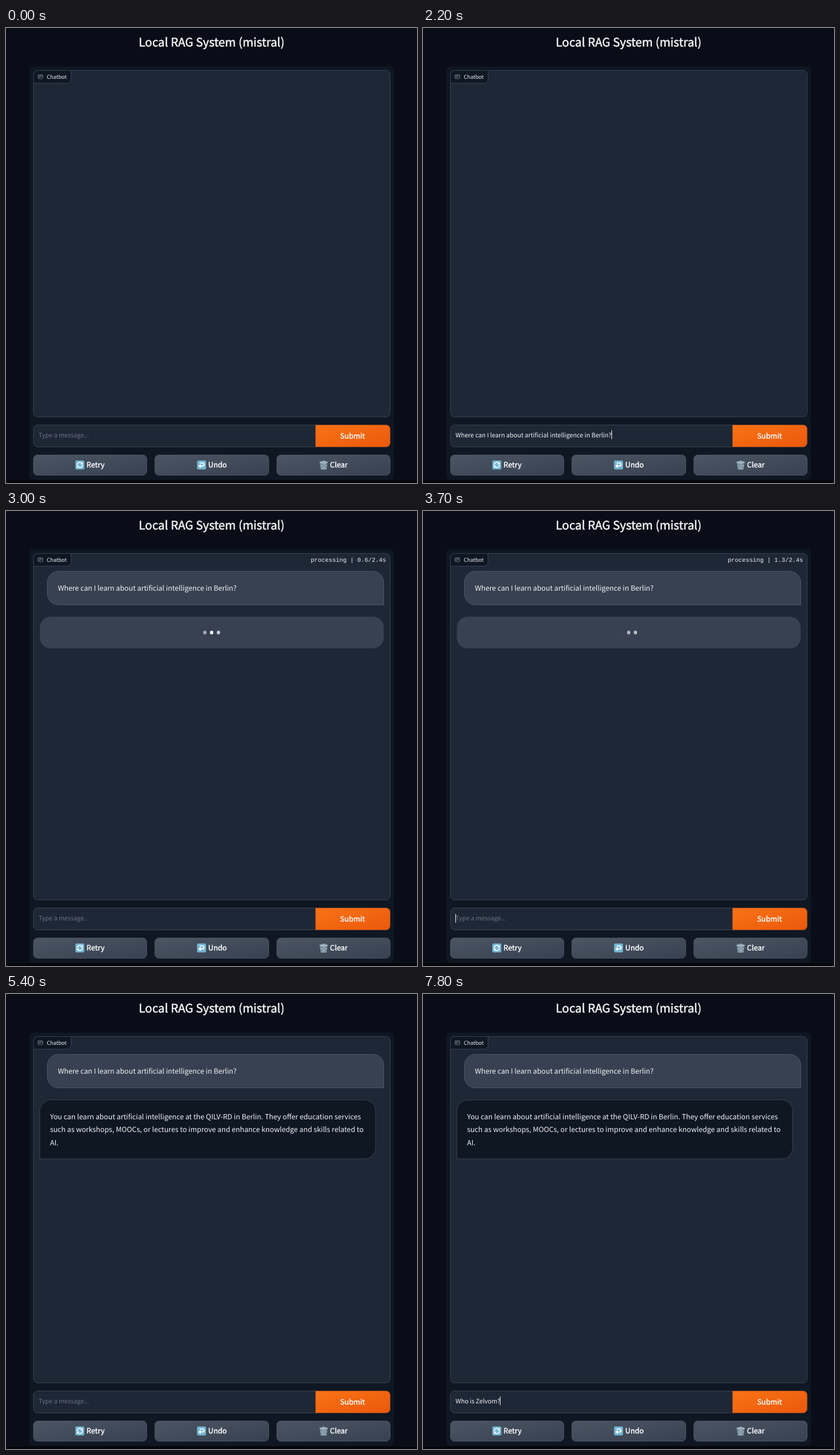
These frames come from a looping animation (711 by 788 pixels, 8 s). An HTML page:

```html
<!DOCTYPE html>
<html lang="en">
<head>
<meta charset="utf-8">
<title>Local RAG System</title>
<style>
  html, body { margin: 0; width: 100%; height: 100%; overflow: hidden; background: #0a0d17; }
  svg { display: block; width: 100vw; height: 100vh; }
  text {
    font-family: "Noto Sans CJK SC", "Noto Sans CJK JP", "Noto Sans", sans-serif;
    font-size: 12.25px; fill: #f3f4f6; text-rendering: geometricPrecision; white-space: pre;
  }
  .title { font-size: 20.35px; stroke: #f3f4f6; stroke-width: .55px; text-anchor: middle; }
  .button { font-size: 12.6px; fill: #fff; stroke: #fff; stroke-width: .4px; }
  .small { font-size: 9.17px; }
  .input { font-size: 10.7px; }
  .hint { fill: #6b7280; }
  .mono { font-family: "Liberation Mono", monospace; font-size: 10.35px; text-anchor: end; }
  .panel { fill: #0f1723; }
  .block { fill: #1e2736; stroke: #374151; }
  .label { fill: #0f1723; stroke: #374151; }
  .user { fill: #374151; stroke: #4b5563; }
  .grey { fill: url(#grey); stroke: #4b5563; }
  .line { fill: none; stroke-linecap: round; stroke-linejoin: round; }
</style>
</head>
<body>
<svg viewBox="0 0 711 788" preserveAspectRatio="none">
  <defs>
    <linearGradient id="grey" x1="0" y1="0" x2="1" y2="1">
      <stop stop-color="#4b5563"/><stop offset="1" stop-color="#374151"/>
    </linearGradient>
    <linearGradient id="orange" x1="0" y1="0" x2="1" y2="1">
      <stop stop-color="#f97316"/><stop offset="1" stop-color="#ea580c"/>
    </linearGradient>
  </defs>

  <rect y="784" width="711" height="4" fill="#050509"/>
  <text class="title" x="355.8" y="31.7">Local RAG System (mistral)</text>
  <rect class="panel" x="40.5" y="66.5" width="630.5" height="716" rx="7"/>

  <rect class="block" x="47.5" y="73.5" width="617" height="600" rx="7"/>
  <path class="label" d="M47.5 95.5V80.5a7 7 0 0 1 7-7H112.5V88.5a7 7 0 0 1-7 7z"/>
  <path class="line" stroke="#9ca3af" stroke-width=".8"
    d="M58.5 87.3H56.3q-.8 0-.8-.8V82q0-.8.8-.8h6.4q.8 0 .8.8v4.500q0 .8-.8.8H61.500l-1.500 1.700M57.300 83.200h4.400M57.300 85.200h2.800"/>
  <text class="small" x="70.6" y="87.5">Chatbot</text>
  <text class="mono" id="status" x="657.5" y="88"></text>

  <g id="question">
    <path class="user" d="M71.5 123.500a19 19 0 0 1 19-19H634.500a19 19 0 0 1 19 19V162.500H90.500a19 19 0 0 1-19-19z"/>
    <text x="89.7" y="137.8">Where can I learn about artificial intelligence in Berlin?</text>
  </g>
  <g id="pending">
    <rect x="58.5" y="183" width="595" height="55" rx="19" fill="#374151"/>
    <g id="dots" fill="#f9fafb">
      <ellipse cx="344" cy="210.500" rx="2.800" ry="3.200"/>
      <ellipse cx="355.800" cy="210.500" rx="2.800" ry="3.200"/>
      <ellipse cx="367.500" cy="210.500" rx="2.800" ry="3.200"/>
    </g>
  </g>
  <g id="answer">
    <path class="label" d="M58.500 285.500V202.500a19 19 0 0 1 19-19H620.500a19 19 0 0 1 19 19V266.500a19 19 0 0 1-19 19z"/>
    <text x="76.2" y="216.800">You can learn about artificial intelligence at the QILV-RD in Berlin. They offer education services</text>
    <text x="76.2" y="239.300">such as workshops, MOOCs, or lectures to improve and enhance knowledge and skills related to</text>
    <text x="76.2" y="261.500">AI.</text>
  </g>

  <path class="block" d="M535.500 725.500H54.500a7 7 0 0 1-7-7V694.500a7 7 0 0 1 7-7H535.500z"/>
  <text class="input hint" id="hint" x="56.3" y="709.300">Type a message...</text>
  <text class="input" id="typed" x="56.3" y="709.300"></text>
  <rect id="caret" y="698" width="1" height="15" fill="#f3f4f6"/>
  <path fill="url(#orange)" stroke="#9a4a20" d="M535.500 687.500H657.500a7 7 0 0 1 7 7V718.500a7 7 0 0 1-7 7H535.500z"/>
  <text class="button" x="599.5" y="710.600" text-anchor="middle">Submit</text>

  <rect class="grey" x="47.500" y="739.500" width="196" height="35" rx="7"/>
  <rect class="grey" x="257.500" y="739.500" width="197" height="35" rx="7"/>
  <rect class="grey" x="468.500" y="739.500" width="196" height="35" rx="7"/>
  <text class="button" x="139.300" y="761.400">Retry</text>
  <text class="button" x="349.800" y="761.400">Undo</text>
  <text class="button" x="560.600" y="761.400">Clear</text>

  <g transform="translate(120 749)">
    <rect width="15.500" height="15.500" rx="2" fill="#71b5d2"/>
    <path class="line" stroke="#fff" stroke-width="1.600" d="M3.200 7.500a4.600 4.600 0 0 1 8-2.800M12.300 8a4.600 4.600 0 0 1-8 2.800"/>
    <path fill="#fff" d="M12.800 2.500v4.300H8.500zM2.700 13V8.700H7z"/>
  </g>
  <g transform="translate(330.500 749)">
    <rect width="15.500" height="15.500" rx="2" fill="#71b5d2"/>
    <path class="line" stroke="#fff" stroke-width="1.800" d="M5.500 9.500H9.500a2.600 2.600 0 0 0 0-5.200H5"/>
    <path fill="#fff" d="M2 9.500l4.500-3.700v7.400z"/>
  </g>
  <g transform="translate(541.500 749)">
    <path fill="#607582" d="M2 3.500h12l-1.400 12H3.400z"/>
    <path class="line" stroke="#a9bfca" stroke-width=".8" d="M2.200 4l1.300 11h9l1.300-11M5 5l1 10M8 5v10M11 5l-1 10M3 8l8 6.500M13 8l-8 6.500M5 4.500l7.500 6M11 4.500l-7.500 6"/>
    <ellipse cx="8" cy="3" rx="7" ry="2" fill="#8ca4b0"/>
    <path class="line" stroke="#c4d4dc" stroke-width=".9" d="M1.300 3.200q6.700 2.600 13.400 0M6 1.200q2-1.200 4 0"/>
  </g>
</svg>
<script>
  const LOOP = 8000, SUBMIT = 2400, ANSWER = 4900;
  const DOT_DELAYS = [0.33, 0.66, 0];
  const CARET_ON = [[1400, 2000], [2200, 2900], [3400, 3900], [7300, 8000]];
  const byId = id => document.getElementById(id);
  const [status, question, pending, dots, answer, hint, typed, caret] =
    ["status", "question", "pending", "dots", "answer", "hint", "typed", "caret"].map(byId);

  const show = (element, on) => element.setAttribute("visibility", on ? "visible" : "hidden");
  const setText = (element, value) => {
    if (element.textContent !== value) element.textContent = value;
  };

  function inputText(t) {
    if (t >= 2200 && t < SUBMIT) return "Where can I learn about artificial intelligence in Berlin?";
    return t >= 7800 ? "Who is Zelvom?" : "";
  }

  function dotOpacity(elapsed, delay) {
    const time = elapsed - delay;
    return time < 0 ? 1 : 1 - Math.abs(2 * (time % 1) - 1);
  }

  function draw(t) {
    const waiting = t >= SUBMIT && t < ANSWER;
    const elapsed = Math.max(0, (t - SUBMIT) * 0.00103);
    const queued = t < SUBMIT + 100;
    show(question, t >= SUBMIT);
    show(pending, waiting);
    show(answer, t >= ANSWER);

    setText(status, waiting ? `${queued ? "queue: 1/1" : "processing"} | ${elapsed.toFixed(1)}/2.4s` : "");
    status.style.fill = queued ? "#6f7885" : "#f3f4f6";
    DOT_DELAYS.forEach((delay, i) => dots.children[i].setAttribute("opacity", dotOpacity(elapsed, delay)));

    const value = inputText(t);
    setText(typed, value);
    show(hint, !value);
    show(caret, CARET_ON.some(([from, to]) => t >= from && t < to));
    caret.setAttribute("x", value ? Math.round(56.3 + typed.getComputedTextLength()) : 56);
    caret.setAttribute("y", value ? 697 : 698);
  }

  const start = performance.now();
  function frame() {
    draw(Math.floor(((performance.now() - start) % LOOP) / 100) * 100);
    requestAnimationFrame(frame);
  }
  frame();
</script>
</body>
</html>
```
